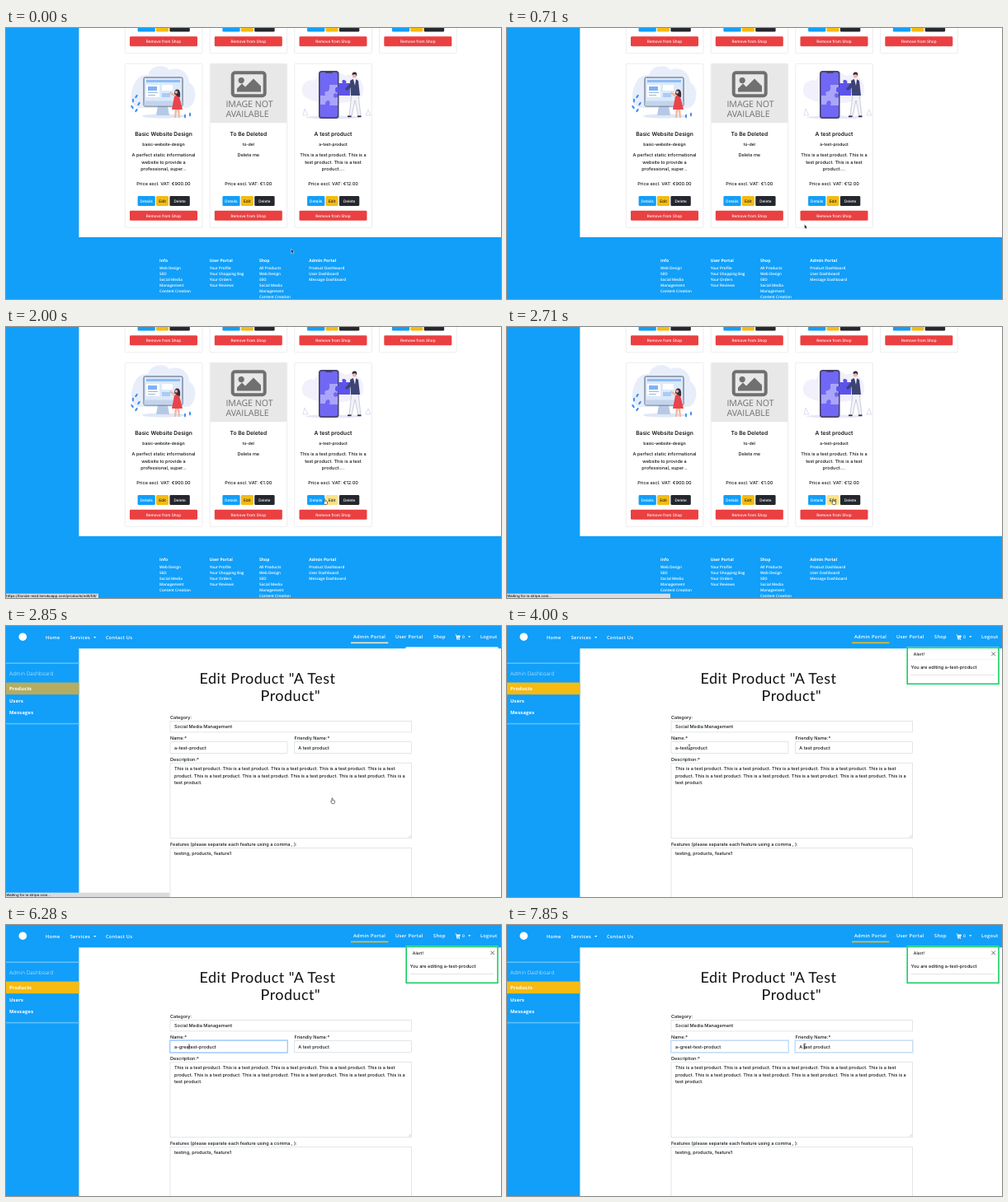
An HTML page that plays this animation: 600x329 px, repeating every 8000 ms.

```html
<!DOCTYPE html>
<html lang="en">
<head>
<meta charset="utf-8">
<title>Product admin</title>
<style>
html, body { margin: 0; width: 100%; height: 100%; overflow: hidden; background: #119ff9; }
svg { display: block; width: 100vw; height: 100vh; }
text { text-rendering: geometricPrecision; white-space: pre; }
.ui { font: 450 5.55px Inter, sans-serif; fill: #15181b; }
.btn { font-size: 4.7px; font-weight: 500; }
.nav { font: 600 5.7px "Open Sans", sans-serif; letter-spacing: .26px; fill: #fff; }
.foot { font: 550 4.62px "Open Sans", sans-serif; fill: #fff; }
</style>
</head>
<body>
<svg id="stage" viewBox="0 0 600 329" preserveAspectRatio="none"></svg>
<script>
const BLUE = '#119ff9', YELLOW = '#f5bb12';
const rect = (x, y, w, h, fill, more = '') =>
  `<rect x="${x}" y="${y}" width="${w}" height="${h}" fill="${fill}" ${more}/>`;
const path = (d, fill, more = '') => `<path d="${d}" fill="${fill}" ${more}/>`;
const circle = (x, y, r, fill) => `<circle cx="${x}" cy="${y}" r="${r}" fill="${fill}"/>`;
const text = (x, y, s, cls = 'ui', style = '', id = '') =>
  `<text x="${x}" y="${y}" class="${cls}" style="${style}" id="${id}">${s}</text>`;
const mid = 'text-anchor:middle;';

// Catalogue page
function button(x, y, w, label, fill, color, id = '') {
  return rect(x, y, w, 12, fill, `rx="1.4" id="${id}"`) +
    text(x + w / 2, y + 7.8, label, 'ui btn', `${mid}fill:${color}`, id && id + 'Label');
}
function card(x, y, product, id) {
  const [name, slug, lines, price] = product;
  const row = (dy, s, style = '') => text(47, dy, s, 'ui', mid + style);
  return `<g transform="translate(${x} ${y})">` +
    rect(.3, .3, 93.6, 199, '#fff', 'rx="1.4" stroke="#dfe0e2" stroke-width=".6"') +
    row(87.7, name, 'font-size:6.7px;font-weight:600') +
    row(100, slug, 'font-size:4.85px;font-weight:600') +
    lines.map((s, i) => row(113.1 + i * 8.55, s)).join('') +
    row(147.8, 'Price excl. VAT: €' + price) +
    button(15.6, 161.1, 21.2, 'Details', BLUE, '#fff', id && id + 'Details') +
    button(38, 161.1, 15, 'Edit', YELLOW, '#1b1e21', id && id + 'Edit') +
    button(54.4, 161.1, 24.4, 'Delete', '#25272e', '#fff') +
    button(6, 178.8, 82, 'Remove from Shop', '#ea4042', '#fff') + '</g>';
}

const monitorArt =
  path('M152 80C156 60 163 57 172 57C176 44 193 44 198 51C211 46 222 55 222 66C233 73 231 92 221 97H160Q150 93 152 80Z', '#e7eefa') +
  `<ellipse cx="191" cy="107" rx="26" ry="2.4" fill="#dfe7f5"/>` +
  path('M184 95H196L198 106H182Z', '#b5c9e6') +
  rect(167, 60, 47, 35, '#dce9fb', 'rx="1.5" stroke="#4c5a70" stroke-width="1"') +
  rect(167.5, 88.5, 46, 6, '#c3d4ec') + rect(170, 63, 41, 3, '#8fbcf6') +
  rect(170, 69, 16, 15, '#fff') + rect(172, 71, 11, 5, '#7db2f7') +
  rect(172, 78, 12, 1, '#9db4d2') + rect(172, 81, 9, 1, '#9db4d2') +
  rect(189, 69, 13, 7, '#fff') + rect(189, 79, 10, 5, '#a9cbf8') +
  [[154, 88], [158, 83], [153, 96], [161, 92], [158, 100], [217, 107], [223, 105]].map(([x, y]) =>
    `<ellipse cx="${x}" cy="${y}" rx="1.1" ry="2.5" fill="#3d8ff0" transform="rotate(${(x % 3 - 1) * 35} ${x} ${y})"/>`).join('') +
  path('M205 96H210L211 109H209L207.5 99L206 109H204Z', '#efb7a5') +
  path('M204 83Q207 80 210 83L214 99H201Z', '#e9434b') +
  path('M204 84L198 79L199 77.5L206 81Z', '#efb7a5') +
  path('M204 80Q204 74 208 74.5Q212 75 211 84L208 83Z', '#3d2b3b') + circle(206.3, 78, 1.7, '#efb7a5');

const placeholderArt = rect(247.6, 43.4, 92.8, 71.8, '#e9e8e9') +
  rect(274.7, 54.3, 39, 28, 'none', 'rx="3" stroke="#707070" stroke-width="4"') +
  circle(285.2, 63.6, 3.6, '#707070') + path('M280 77.6V73.6L286 67.6L290 71.6L300 61.6L309 70.6V77.6Z', '#707070') +
  ['IMAGE NOT', 'AVAILABLE'].map((s, i) =>
    text(266.4, 95.5 + 12 * i, s, 'ui', 'font:500 10.6px Open Sans,sans-serif;fill:#707070')).join('');

const puzzleArt =
  path('M360 81C356 68 365 62 374 64C384 47 402 51 411 58C426 52 437 68 432 81C425 94 371 96 360 81Z', '#f1f0fb') +
  `<ellipse cx="397" cy="108.5" rx="34" ry="2" fill="#e8e7f6"/>` +
  rect(379, 52, 24.5, 58, '#46436b', 'rx="3.5"') + rect(380.6, 53.8, 21.3, 54.4, '#7068f4', 'rx="2.2"') +
  rect(387, 53, 9, 2, '#46436b', 'rx="1"') +
  path('M392 69H402V80Q397 78 397 82Q397 86 402 84V94H392Q394 88 390 88Q387 89 387 93H381V82H387Q385 77 389 77Q393 77 392 69Z', '#aaa5fb') +
  path('M403 67H408Q406 62.5 410 63Q413.5 64 412 67H417V82H403V78Q399 79 399 75Q399 71 403 72Z', '#5c53ea') +
  path('M360 106L362 98L366 106ZM436 106L439 99L442 106Z', 'none', 'stroke="#c9c7ea" stroke-width=".6"') +
  path('M419 80H427L430 107H427L423 88L419 107H416Z', '#f2f2fa', 'stroke="#9ea0bf" stroke-width=".5"') +
  path('M417 64Q422 60 427 64L429 82H418Z', '#3c4474') +
  path('M418 66L411 74L413 76L421 70Z', '#3c4474') + path('M421 62H424L423 70Z', '#fff') +
  circle(422.3, 58, 2.5, '#efb59e') + path('M419.5 57Q419 53.5 423 53.5Q426 54 425 58.5L423.5 56Z', '#2c274c') +
  rect(414, 106.5, 4.5, 1.7, '#2c274c') + rect(426, 106.5, 4.5, 1.7, '#2c274c');

const products = [
  ['Basic Website Design', 'basic-website-design',
    ['A perfect static informational', 'website to provide a', 'professional, super...'], '900.00'],
  ['To Be Deleted', 'to-del', ['Delete me'], '1.00'],
  ['A test product', 'a-test-product',
    ['This is a test product. This is a', 'test product. This is a test', 'product....'], '12.00']
];
const columns = [144, 246.8, 349.5, 452.3];
const footer = [
  [186, 'Info', 'Web Design', 'SEO', 'Social Media', 'Management', 'Content Creation'],
  [246.7, 'User Portal', 'Your Profile', 'Your Shopping Bag', 'Your Orders', 'Your Reviews'],
  [307, 'Shop', 'All Products', 'Web Design', 'SEO', 'Social Media', 'Management', 'Content Creation'],
  [367.3, 'Admin Portal', 'Product Dashboard', 'User Dashboard', 'Message Dashboard']
];
const catalogue = rect(0, 0, 600, 329, BLUE) + rect(88.5, 0, 511.5, 254, '#fff') + rect(88.3, 0, .6, 254, '#c6d3dd') +
  columns.map(x => card(x, -168.5, products[0])).join('') +
  products.map((p, i) => card(columns[i], 43, p, i == 2 && 'hot')).join('') +
  monitorArt + placeholderArt + puzzleArt +
  footer.map(([x, head, ...items]) => text(x, 283.9, head, 'foot', 'font-size:5px;font-weight:700') +
    items.map((s, i) => text(x, 293.2 + i * 6.87, s, 'foot')).join('')).join('');

// Edit page
const field = (x, y, w, h, id = '') =>
  rect(x, y, w, h, '#fff', `stroke="#cfd4da" stroke-width=".6" id="${id}"`);
const caretDown = (x, y) => path(`M${x} ${y}h3.4l-1.7 1.8z`, '#fff');
const sentence = 'This is a test product. ';
const description = [sentence.repeat(4) + 'This is a test',
  'product. ' + sentence.repeat(4) + 'This is a', 'test product.'];
const title = 'font:18px Lato,sans-serif;letter-spacing:.45px;fill:#111';

const editor = rect(0, 0, 600, 329, BLUE) + rect(88.5, 27.3, 512, 302, '#fff') +
  rect(88.5, 27.3, .8, 302, '#d3dde5') + circle(20.3, 13.2, 4.8, '#fff') +
  [[48, 'Home'], [77.7, 'Services'], [121, 'Contact Us']].map(([x, s]) => text(x, 16, s, 'nav')).join('') +
  [[421, 'Admin Portal'], [472, 'User Portal'], [518, 'Shop'], [575, 'Logout']]
    .map(([x, s]) => text(x, 15, s, 'nav')).join('') +
  text(553, 15, '0', 'nav', 'font-size:5px') + caretDown(106, 13) + caretDown(560, 12.2) +
  path('M544.5 10.4h1.4l.3 1h4.6l-.7 3.1h-3.3l.1.6h3v.6h-3.6l-.9-4.6h-.9z', '#fff') +
  circle(547.1, 16.3, .6, '#fff') + circle(549.6, 16.3, .6, '#fff') +
  rect(418, 19.6, 45.3, 1.6, YELLOW, 'id="underline"') +
  rect(0, 44.4, 88.5, 1.6, '#5dbffb') + rect(0, 117.8, 88.5, 1.6, '#5dbffb') +
  text(4, 60, 'Admin Dashboard', 'nav', 'font-size:6.4px;font-weight:300;letter-spacing:.1px') +
  rect(0, 68.6, 88.5, 14.6, YELLOW, 'id="active"') +
  ['Products', 'Users', 'Messages'].map((s, i) => text(4, 78 + i * 14.5, s, 'nav', 'font-weight:700')).join('') +
  text(234.6, 70.2, 'Edit Product "A Test', 'ui', title) + text(308.6, 91, 'Product"', 'ui', title) +
  text(199, 112.8, 'Category:') + field(199, 115.3, 292.4, 13.6) + text(204, 124.2, 'Social Media Management') +
  text(199, 138.1, 'Name:*') + text(349.5, 138.1, 'Friendly Name:*') +
  field(199, 140.7, 142, 13.6, 'nameBox') + field(349.6, 140.7, 141.8, 13.6, 'friendlyBox') +
  text(204, 149.6, '', 'ui', '', 'name') + text(354.3, 149.6, 'A test product', 'ui', '', 'friendly') +
  rect(0, 144.2, .6, 7, '#111', 'id="caret"') +
  text(199, 163.6, 'Description:*') + field(199, 166.2, 292.4, 91.6) +
  description.map((s, i) => text(204, 175.1 + i * 8.55, s)).join('') +
  path('M488 256.6l2.4-2.4M489.4 256.6l1-1', 'none', 'stroke="#888" stroke-width=".4"') +
  text(199, 267.2, 'Features (please separate each feature using a comma , ):') +
  field(199, 269.4, 292.4, 70) + text(204, 278.4, 'testing, products, feature1') +
  rect(484.5, 25.6, 112.2, 45.4, '#fff', 'rx="1"') + '<g id="toast">' +
  rect(485.2, 26.4, 110.8, 43.9, '#fff', 'stroke="#17cf63" stroke-width="1.6"') +
  text(492.8, 36, 'Alert!', 'ui', 'font-size:5.1px') +
  path('M587.3 31.5l4.6 4.6m0-4.6l-4.6 4.6', 'none', 'stroke="#333" stroke-width=".7"') +
  rect(486, 40.5, 109.2, .4, '#e6e6e6') + text(489.6, 51.5, 'You are editing a-test-product') +
  rect(489.6, 59, 101.6, .6, '#d2d2d2') + '</g>';

const outline = 'stroke="#fff" stroke-width=".5" stroke-linejoin="round"';
stage.innerHTML = `<g id="catalogue">${catalogue}</g><g id="editor">${editor}</g>` +
  `<g id="status">${rect(0, 323.7, 100, 6, '#d9dbde', 'id="statusBar"')}${text(.3, 328.2, '', 'ui', 'font-size:4.25px', 'statusText')}</g>` +
  `<g id="arrow">${path('M-.5 -2.8V2.6L.7 1.6L1.5 3.2L2.4 2.8L1.7 1.2H3.2Z', '#111', outline)}</g>` +
  `<g id="hand">${path('M-1.1 -2.9q.6-.7 1.1.2v2q2.1 0 2.5.8v2l-.6 1.5h-2.8l-1.6-2.6q0-.9 1.4-.1z', '#fff', 'stroke="#222" stroke-width=".6"')}</g>` +
  `<g id="beam">${path('M-1.3 -3Q0 -3 0 -2.2Q0 -3 1.3 -3M0 -2.4V2.6M-1.3 3.2Q0 3.2 0 2.4Q0 3.2 1.3 3.2', 'none', 'stroke="#222" stroke-width=".6"')}</g>`;

// Motion
const $ = id => document.getElementById(id);
const show = (id, on) => $(id).style.display = on ? '' : 'none';
const set = (id, key, value) => $(id).setAttribute(key, value);
const ramp = (t, a, b) => Math.min(1, Math.max(0, (t - a) / (b - a)));
const route = [[140, 346, 271], [1270, 375.5, 212], [1850, 375.5, 212], [2130, 396, 212], [2990, 396, 212],
  [3800, 221, 147], [4050, 221, 147], [4350, 211, 148], [6800, 211, 148], [7550, 361, 147]];
const typed = [5710, 5850, 6000, 6140, 6420, 6710];
const CLICK_NAME = 4420, CLICK_FRIENDLY = 7780;

function pointer(t) {
  const i = route.findIndex(p => p[0] > t);
  if (i < 1) return route.at(i).slice(1);
  const [a, b] = [route[i - 1], route[i]], k = ramp(t, a[0], b[0]), e = k * k * (3 - 2 * k);
  return [1, 2].map(n => a[n] + (b[n] - a[n]) * e);
}
function statusAt(t) {
  const host = 'tionize-ms4.herokuapp.com';
  if (t < 1280 || t >= 3200) return ['', 0];
  if (t < 1990) return [`https://${host}/products/58/`, 102];
  if (t < 2140) return [`https://${host}/products/edit/58/`, 112];
  return [`Waiting for ${t < 2420 ? host : 'm.stripe.com'}...`, 198];
}
function focus(id, k) {
  set(id, 'stroke', `color-mix(in srgb, #80b4fb ${k * 100}%, #cfd4da)`);
  set(id, 'style', `outline:${1.3 * k}px solid rgba(0,123,255,${.28 * k})`);
}
function render(t) {
  const editing = t >= 2850;
  show('catalogue', !editing);
  show('editor', editing);

  const onDetails = t >= 1270 && t < 1990, onEdit = t >= 1990;
  set('hotDetails', 'fill', onDetails ? '#7edcfb' : BLUE);
  $('hotDetailsLabel').style.fill = onDetails ? '#1b3a4c' : '#fff';
  set('hotEdit', 'fill', onEdit ? '#fde287' : YELLOW);

  const [label, width] = statusAt(t);
  show('status', width);
  set('statusBar', 'width', width);
  $('statusText').textContent = label;

  const fade = ramp(t, 2860, 2990);
  set('active', 'fill', `color-mix(in srgb, ${YELLOW} ${fade * 100}%, #b5ac62)`);
  set('underline', 'fill', `color-mix(in srgb, ${YELLOW} ${fade * 100}%, #fbe7b4)`);
  set('toast', 'opacity', ramp(t, 2880, 3150));

  const count = typed.filter(k => k <= t).length;
  $('name').textContent = 'a-' + 'great-'.slice(0, count) + 'test-product';
  const left = ramp(t, CLICK_FRIENDLY, CLICK_FRIENDLY + 150);
  focus('nameBox', ramp(t, CLICK_NAME, CLICK_NAME + 150) * (1 - left));
  focus('friendlyBox', left);
  const inFriendly = t >= CLICK_FRIENDLY;
  const clicked = inFriendly ? CLICK_FRIENDLY : count ? typed[count - 1] : CLICK_NAME;
  show('caret', t >= CLICK_NAME && (t - clicked) % 1000 < 500);
  if (editing) set('caret', 'x', inFriendly
    ? 354.3 + $('friendly').getSubStringLength(0, 2)
    : 204 + $('name').getSubStringLength(0, 2 + count));

  const [x, y] = pointer(t), hidden = t >= typed[0] && t < 6800;
  const kind = hidden ? '' : t < 1270 ? 'arrow' : t < 2990 ? 'hand' : 'beam';
  for (const id of ['arrow', 'hand', 'beam']) {
    show(id, id == kind);
    set(id, 'transform', `translate(${x} ${y})`);
  }
}
function loop(now) {
  render(now % 8000);
  requestAnimationFrame(loop);
}
render(0);
requestAnimationFrame(loop);
</script>
</body>
</html>
```
